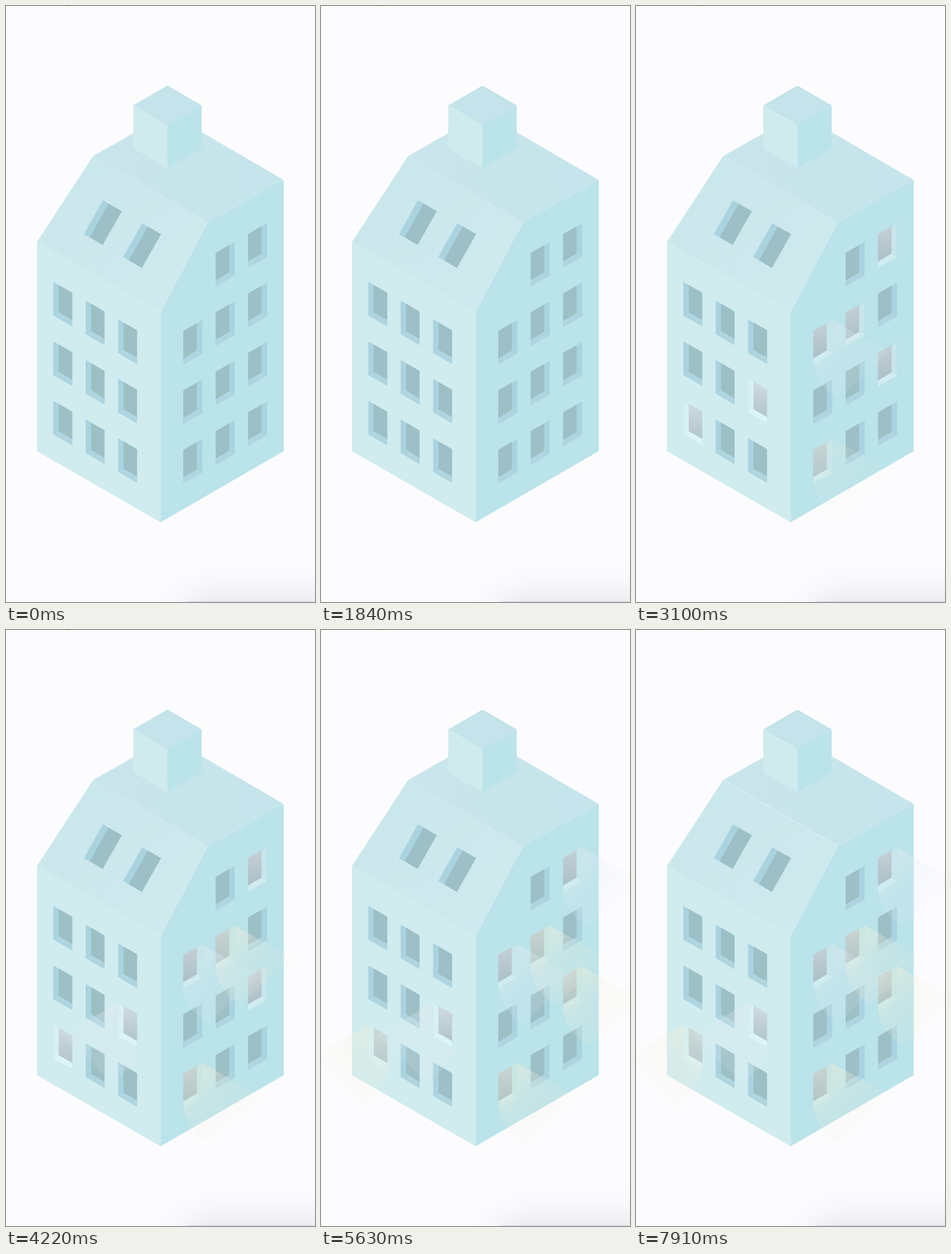
An HTML page with a canvas for the animation above (8 s loop, 539x1038 px).

```html
<!DOCTYPE html>
<html lang="en">
<head>
<meta charset="utf-8">
<title>House lights</title>
<style>
html, body { margin: 0; width: 100%; height: 100%; overflow: hidden; background: #fcfcfe; }
canvas { display: block; }
</style>
</head>
<body>
<canvas id="stage" width="539" height="1038"></canvas>
<script>
const ctx = document.getElementById('stage').getContext('2d');
const LOOP = 8000;
const SLOPE = 0.577;
const COL = 56.5, FLOOR = 103.5;
const WIDTH = 33, HEIGHT = 58.5, DEPTH = 9.5;
const RISE = WIDTH * SLOPE;

const lights = [
  { wall: 'R', col: 0, floor: 1, wave: 1 },
  { wall: 'R', col: 0, floor: 3, wave: 1, warm: true },
  { wall: 'R', col: 1, floor: 1, wave: 2, warm: true },
  { wall: 'L', col: 2, floor: 1, wave: 2 },
  { wall: 'R', col: 2, floor: 0, wave: 3 },
  { wall: 'R', col: 2, floor: 2, wave: 3, warm: true },
  { wall: 'L', col: 0, floor: 2, wave: 3, warm: true }
];

// Window opening in wall space: slanted up to the right
const opening = [[0, RISE], [WIDTH, 0], [WIDTH, HEIGHT], [0, HEIGHT + RISE]];

function trace(points) {
  ctx.beginPath();
  points.forEach(([x, y]) => ctx.lineTo(x, y));
  ctx.closePath();
}

function poly(points, fill) {
  trace(points);
  ctx.fillStyle = fill;
  ctx.fill();
}

function blend(x0, y0, x1, y1, ...colors) {
  const g = ctx.createLinearGradient(x0, y0, x1, y1);
  colors.forEach((c, i) => g.addColorStop(i / (colors.length - 1), c));
  return g;
}

function ease(t, start, length) {
  const k = Math.min(1, Math.max(0, (t - start) / length));
  return k * k * (3 - 2 * k);
}

// The pane is the opening pushed inwards, cut off by the opening itself
function recess(points, dx, dy, fill) {
  ctx.save();
  trace(points);
  ctx.clip();
  poly(points.map(([x, y]) => [x + dx, y + dy]), fill);
  ctx.restore();
}

// The left wall is the mirrored right wall
function atWindow({ wall, col, floor }, draw) {
  const climb = col * COL * SLOPE;
  ctx.save();
  if (wall === 'R') {
    ctx.translate(309.3 + col * COL, 443.5 + floor * FLOOR - climb);
  } else {
    ctx.translate(115.5 + col * COL, 480.5 + floor * FLOOR + climb);
    ctx.scale(-1, 1);
  }
  draw();
  ctx.restore();
}

function frame(side, sill, pane) {
  const inX = WIDTH - DEPTH, inY = HEIGHT - DEPTH * SLOPE;
  poly(opening, side);
  poly([[0, inY + inX * SLOPE], [inX, inY], [WIDTH, HEIGHT], [0, HEIGHT + RISE]], sill);
  recess(opening, -DEPTH, -DEPTH * SLOPE, pane);
}

function glow(light, t) {
  const on = ease(t, 1950 + light.floor * 100, 650);
  if (!on) return;
  const left = light.wall === 'L';
  const pane = (top, bottom) => blend(0, 10, 8, 64, top, bottom);
  atWindow(light, () => {
    ctx.globalAlpha = on;
    if (left) frame('#d8f0f5', '#dcf4f8', pane('#cddae0', '#b4c5cc'));
    else frame('#c6e6ec', '#d0ecf0', pane('#c4d0d6', '#acc0c7'));
    if (light.warm) {
      ctx.globalAlpha = beamLevel(light, t) * 0.8;
      if (left) frame('#d9efec', '#def2ef', pane('#cad5d5', '#b6c6c8'));
      else frame('#cce7e1', '#d3ebe6', pane('#c7d0cd', '#b0c1c2'));
    }
  });
}

function beamLevel({ wave, floor }, t) {
  return ease(t, 1300 + wave * 1000 + floor * 150, 750);
}

function beam(light, t) {
  const on = beamLevel(light, t);
  if (!on) return;
  const tone = light.warm ? '240,237,216' : '226,234,240';
  const reach = 98;
  atWindow(light, () => {
    ctx.globalAlpha = on;
    ctx.beginPath();
    ctx.moveTo(WIDTH, HEIGHT);
    ctx.lineTo(WIDTH, 0);
    ctx.lineTo(WIDTH + reach, reach * SLOPE);
    ctx.lineTo(43, 139);
    ctx.quadraticCurveTo(4, 112, 0, HEIGHT + RISE);
    ctx.fillStyle = blend(22, 42, 88, 104,
      `rgba(${tone},.42)`, `rgba(${tone},.2)`, `rgba(${tone},.16)`, `rgba(${tone},.12)`);
    ctx.fill();
  });
}

function skylight(x, y) {
  const hole = [[33, 0], [66, 19], [32.5, 78], [0, 59]].map(([px, py]) => [px + x, py + y]);
  poly(hole, '#a9d3df');
  recess(hole, 10, 10 * SLOPE, '#9dbfc6');
}

function chimney(x, y, half, tall) {
  const drop = half * SLOPE;
  const mid = x + half, right = mid + half;
  poly([[x, y], [mid, y - drop], [right, y], [mid, y + drop]], '#c4e3ea');
  poly([[x, y], [mid, y + drop], [mid, y + drop + tall], [x, y + tall]], '#cfebee');
  poly([[mid, y + drop], [right, y], [right, y + tall], [mid, y + drop + tall]], '#bbe3ea');
}

function house(t) {
  const eaveL = [54, 411], eaveR = [269.6, 534.3];
  const ridgeL = [152, 261.3], ridgeR = [352.3, 377];
  const back = [284, 186.5], far = [484.5, 303];
  const foot = [269.6, 899.3], footL = [54, 775.3], footR = [484.5, 775.3];
  poly([ridgeL, back, far, ridgeR], blend(150, 261, 484, 303, '#cae5ec', '#c5e4eb'));
  poly([eaveL, ridgeL, ridgeR, eaveR], blend(110, 330, 270, 520, '#cae7ec', '#ceeaee'));
  poly([eaveL, eaveR, foot, footL], '#d0ecef');
  poly([eaveR, ridgeR, far, footR, foot], '#bae3ea');

  ctx.strokeStyle = `rgba(236,246,249,${ease(t, 5700, 500) * 0.7})`;
  ctx.beginPath();
  ctx.moveTo(...ridgeL);
  ctx.lineTo(...ridgeR);
  ctx.stroke();

  chimney(222, 173, 59.7, 75);
}

function backdrop() {
  ctx.fillStyle = '#fcfcfe';
  ctx.fillRect(0, 0, 539, 1038);
  ctx.fillStyle = 'rgba(130,130,120,.3)';
  ctx.fillRect(107, 0, 4, 1);

  ctx.save();
  ctx.shadowColor = 'rgba(120,117,118,.24)';
  ctx.shadowBlur = 62;
  ctx.fillStyle = '#cfcddb';
  ctx.fillRect(316, 1037, 400, 200);
  ctx.restore();
}

function draw(t) {
  backdrop();
  house(t);
  skylight(136, 338.3);
  skylight(204.5, 378.3);
  const dark = () => frame('#a9d3df', '#aed5e0', '#9dbfc6');
  for (let col = 0; col < 3; col++) {
    for (let floor = 0; floor < 4; floor++) {
      if (floor < 3) atWindow({ wall: 'L', col, floor }, dark);
      if (col || floor) atWindow({ wall: 'R', col, floor }, dark);
    }
  }
  lights.forEach(light => glow(light, t));
  lights.forEach(light => beam(light, t));
}

function tick() {
  draw(performance.now() % LOOP);
  requestAnimationFrame(tick);
}
tick();
</script>
</body>
</html>
```
